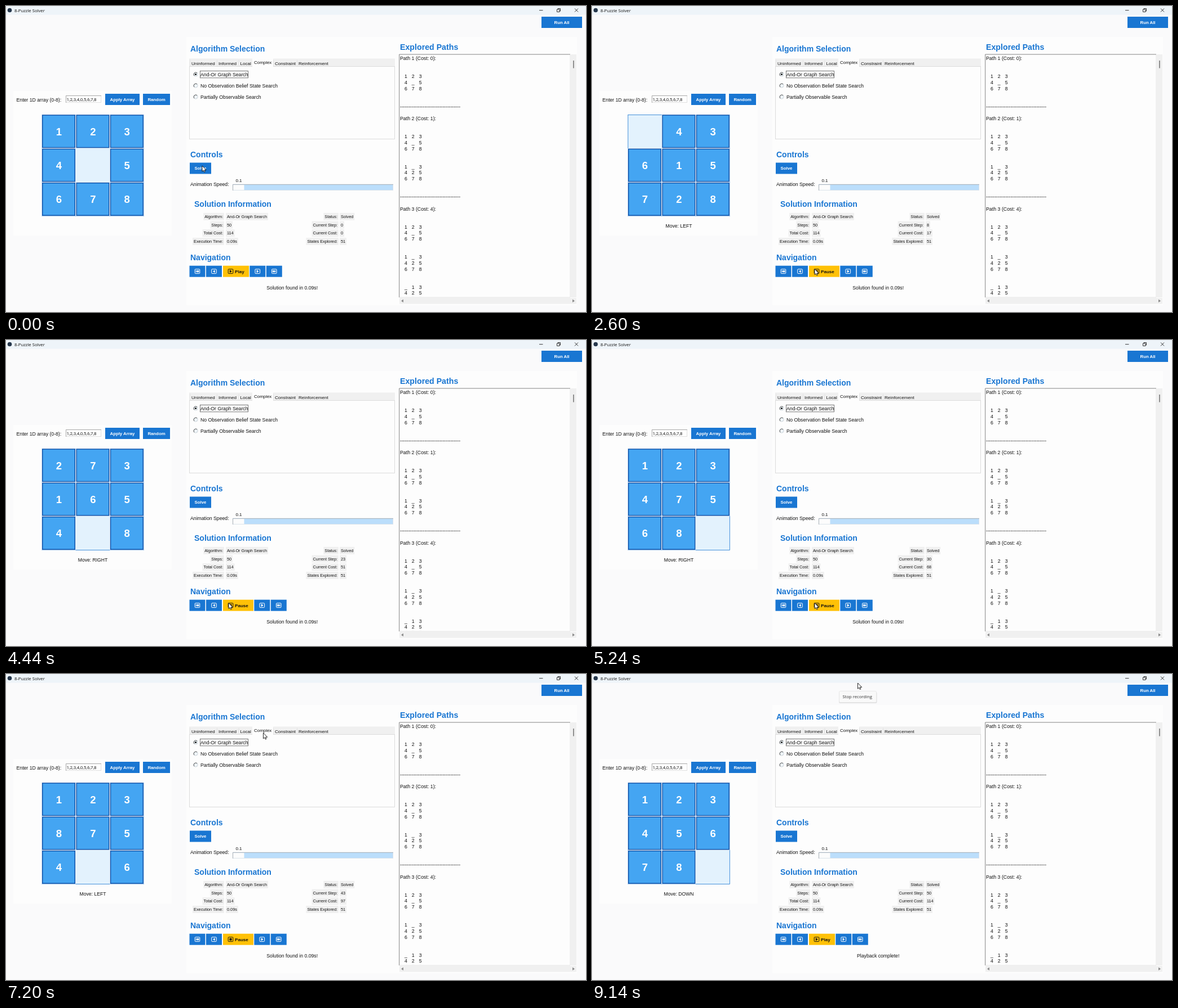
Animation, 1029 px wide and 544 px high, one loop 9.17 s. Source, as an HTML page:

```html
<!DOCTYPE html>
<html lang="en">
<head>
<meta charset="utf-8">
<title>8-Puzzle Solver</title>
<style>
html, body { margin: 0; width: 100%; height: 100%; overflow: hidden; background: #fafafb; }
svg { display: block; width: 100vw; height: 100vh; font-family: "Liberation Sans", Arial, sans-serif; }
text { white-space: pre; }
.b { font-weight: bold; }
.ui { font-family: "Open Sans", "Noto Sans", sans-serif; }
.num { font-family: Roboto, sans-serif; }
</style>
</head>
<body>
<svg viewBox="0 0 1029 544">
  <g id="base"></g>
  <g id="live"></g>
  <path id="cursor" d="M0 0V10.2L2.3 8.1L3.8 11.4L5.4 10.7L4 7.5H7.2Z" fill="#fff" stroke="#111" stroke-width=".9"/>
</svg>
<script>
const BLUE = '#1976d2', GREY = '#f0f0f0';
const pen = document.createElement('canvas').getContext('2d');

const rect = (x, y, w, h, fill, more = '') =>
  `<rect x="${x}" y="${y}" width="${w}" height="${h}" fill="${fill}" ${more}/>`;
const path = (d, stroke, width = 1, fill = 'none') =>
  `<path d="${d}" stroke="${stroke}" stroke-width="${width}" fill="${fill}"/>`;
// y is the middle of the capitals
const text = (x, y, str, size = 8.7, fill = '#111', cls = '', anchor = 'start') =>
  `<text x="${x}" y="${y + size * .36}" font-size="${size}" fill="${fill}" class="${cls}" text-anchor="${anchor}">${str}</text>`;
const heading = (x, y, str, size = 14) => text(x, y, str, size, BLUE, 'b');
const button = (x, y, w, str) =>
  rect(x, y, w, 20, BLUE) + text(x + w / 2, y + 10, str, 7.8, '#fff', 'b', 'middle');

function cell(x, y, str, right) {
  pen.font = '7.3px "Liberation Sans", Arial, sans-serif';
  const w = pen.measureText(str).width;
  return rect(right ? x - w - 2 : x - 2, y - 6.5, w + 4, 13, GREY) +
    text(x, y, str, 7.3, '#111', '', right ? 'end' : 'start');
}

function radio(y, str, on) {
  return `<circle cx="336.5" cy="${y}" r="3.6" fill="#eef5fa" stroke="#ccd3d8"/>` +
    path(`M333.9 ${y + 2.6}A3.7 3.7 0 0 1 339.1 ${y - 2.6}`, '#555') +
    (on ? `<circle cx="336.5" cy="${y}" r="1.6" fill="#111"/>` : '') + text(345, y, str);
}

const glyphs = {
  first: 'M-2.5 -2V2M2.5 -2L0 0L2.5 2ZM0 -2L-2 0L0 2Z',
  prev: 'M1.3 -2L-1.5 0L1.3 2Z',
  play: 'M-1.3 -2.2L1.8 0L-1.3 2.2Z',
  stop: 'M-1.7 -1.7H1.7V1.7H-1.7Z',
  last: 'M2.5 -2V2M-2.5 -2L0 0L-2.5 2ZM0 -2L2 0L0 2Z'
};
const icon = (x, name, color) => `<g transform="translate(${x} 471.7)">` +
  rect(-4.3, -3.9, 8.6, 7.8, 'none', `rx="1" stroke="${color}"`) +
  path(glyphs[name], color, .6, color) + '</g>';
const navButton = (x, name) => rect(x, 461.7, 28, 20, BLUE) + icon(x + 14, name, '#fff');

function explored() {
  const row = k => 93 + 10.7 * k;
  const grid = (k, rows) => rows.map((r, i) => [...r].map((c, j) =>
    text(709.5 + 12.8 * j, row(k + i), c, 8.8, '#111', '', 'middle')).join('')).join('');
  const title = (k, n, cost) => text(699, row(k), `Path ${n} (Cost: ${cost}):`, 8.8);
  const rule = k => text(699, row(k), '-'.repeat(37), 8.7, '#000');
  const a = ['123', '4_5', '678'], b = ['1_3', '425', '678'];
  return title(0, 1, 0) + grid(3, a) + rule(8) +
    title(10, 2, 1) + grid(13, a) + grid(18, b) + rule(23) +
    title(25, 3, 4) + grid(28, a) + grid(33, b) + grid(38, ['_13', '425']);
}

const tabs = [[329, 'Uninformed'], [377, 'Informed'], [415.5, 'Local'], [477, 'Constraint'], [519, 'Reinforcement']];
const info = [['Algorithm:', 'And-Or Graph Search', 'Status:', 'Solved'], ['Steps:', '50', 'Current Step:'],
  ['Total Cost:', '114', 'Current Cost:'], ['Execution Time:', '0.09s', 'States Explored:', '51']];
const infoY = i => 374.3 + 14.75 * i;

document.getElementById('base').innerHTML = [
  rect(0, 0, 1029, 544, '#fafafb'),
  rect(13, 151, 281, 257, '#fdfdfd'), rect(320, 55, 693, 477, '#fdfdfd'),
  // title bar
  rect(0, 0, 1029, 15.5, '#eef4f9'),
  '<circle cx="6.5" cy="7.5" r="3.8" fill="#26384d"/>',
  text(15, 7.8, '8-Puzzle Solver', 7.7, '#111', 'ui'),
  path('M946 7.7H952.5M1009 4.5L1015 10.5M1015 4.5L1009 10.5', '#222', .9),
  path('M977.5 6H982V10.5H977.5ZM979 6V4.5H983.5V9H982', '#222', .9),
  button(950, 19, 72, 'Run All'),
  // input row
  text(18.5, 166.5, 'Enter 1D array (0-8):'),
  rect(106.5, 159.5, 62, 12, '#fff', 'stroke="#e0e0e0"'), path('M106.5 172V159.5H169', '#999', .8),
  text(107.5, 166, '1,2,3,4,0,5,6,7,8', 8, '#222', 'num'),
  button(176, 156, 61, 'Apply Array'), button(243, 156, 48, 'Random'),
  // algorithm tabs
  heading(327, 75.5, 'Algorithm Selection'),
  rect(325, 93.5, 365, 14, GREY), rect(325.5, 107.5, 364, 129, '#fdfdfd', 'stroke="#dcdcdc"'),
  tabs.map(([x, s]) => path(`M${x - 2.5} 95.5V107`, '#ddd', .7) + text(x, 101.8, s, 8.1)).join(''),
  rect(437, 93, 37, 15, '#fdfdfd'), text(440, 100.5, 'Complex', 7.95),
  radio(121.5, 'And-Or Graph Search', true), rect(344.5, 115.5, 85, 12.3, 'none', 'stroke="#555" stroke-width=".8"'),
  radio(141.5, 'No Observation Belief State Search'), radio(161.5, 'Partially Observable Search'),
  // controls
  heading(327, 264, 'Controls'), button(326, 278.5, 38, 'Solve'),
  text(327, 316.5, 'Animation Speed:'), text(413, 310.5, '0.1', 8, '#111', '', 'middle'),
  rect(402, 317, 285, 10.7, '#bbdefb'), rect(403, 318, 19.5, 9.2, '#fcfcfc'),
  path('M402.5 328V317.3H687', '#a3a9ad', .9), path('M403 327.5H686.5V318', '#dde3e8', .8),
  // information
  heading(334, 352, 'Solution Information'),
  info.map((r, i) => cell(385, infoY(i), r[0], true) + cell(392, infoY(i), r[1]) +
    cell(588, infoY(i), r[2], true) + (r[3] ? cell(594, infoY(i), r[3]) : '')).join(''),
  heading(327, 447, 'Navigation'), navButton(325.5, 'first'), navButton(355, 'prev'),
  // explored paths
  heading(699, 72.5, 'Explored Paths', 14.2),
  rect(698, 86, 303, 432, '#fdfdfd'), path('M697.7 518V86H1001', '#777', .9),
  path('M698 518H1001V87', '#e3e3e3'),
  rect(1002, 86, 10, 432, GREY), rect(1006, 97, 1.8, 13.5, '#868686'),
  rect(698, 519, 314, 10.5, GREY),
  path('M705 521.5L701 524.2L705 527Z', 'none', 0, '#8a8a8a'),
  path('M1005 521.5L1009 524.2L1005 527Z', 'none', 0, '#8a8a8a'),
  explored()
].join('');

// moves of the blank, and the price of each direction
const moves = 'ULDDRUULDDRUULDDRUULDDRUULDDRRUULDDLURURDDLULDRURD';
const dirs = { U: [-3, 1, 'UP'], D: [3, 2, 'DOWN'], L: [-1, 3, 'LEFT'], R: [1, 4, 'RIGHT'] };
const states = [{ tiles: [1, 2, 3, 4, 0, 5, 6, 7, 8], cost: 0, move: '' }];
for (const m of moves) {
  const { tiles, cost } = states.at(-1), [shift, price, name] = dirs[m];
  const next = [...tiles], hole = next.indexOf(0);
  next[hole] = next[hole + shift];
  next[hole + shift] = 0;
  states.push({ tiles: next, cost: cost + price, move: 'Move: ' + name });
}

function board(tiles) {
  return rect(63.9, 193.4, 180.4, 180, '#e3f2fd', `stroke="${BLUE}" stroke-width=".8"`) +
    tiles.map((n, i) => {
      const x = 64 + 60.4 * (i % 3), y = 193.3 + 60.3 * Math.floor(i / 3);
      return n ? rect(x - .7, y - .7, 60.4, 60.4, '#f1f7fc') +
        rect(x + .7, y + .7, 57.6, 57.6, '#44a5f2', 'stroke="#0d4ea6" stroke-width="1.4"') +
        text(x + 29.9, y + 29.7, n, 18.5, '#fff', 'b', 'middle') : '';
    }).join('');
}

function scene(step, playing, done, tip) {
  const s = states[step], w = playing ? 54 : 46;
  return board(s.tiles) + text(154, 391, s.move, 8.6, '#111', '', 'middle') +
    cell(594, infoY(1), String(step)) + cell(594, infoY(2), String(s.cost)) +
    rect(385, 461.7, w, 20, '#ffc107') + icon(398.5, playing ? 'stop' : 'play', '#111') +
    text(406, 471.8, playing ? 'Pause' : 'Play', 8.1, '#111', 'b') +
    navButton(386.3 + w, 'play') + navButton(415.8 + w, 'last') +
    text(507.7, 501, done ? 'Playback complete!' : 'Solution found in 0.09s!', 8.7, '#111', '', 'middle') +
    (tip ? rect(438, 32, 67.5, 20, '#000', 'rx="2" opacity=".1"') +
      rect(438.5, 30.5, 66, 20, '#f9f9f9', 'rx="2" stroke="#e2e2e2" stroke-width=".7"') +
      text(470.7, 40.5, 'Stop recording', 7.7, '#333', 'ui', 'middle') : '');
}

// piecewise interpolation through [time, ...values]
function track(keys, t, ease = k => k) {
  if (t <= keys[0][0]) return keys[0].slice(1);
  const i = keys.findIndex(k => k[0] > t);
  if (i < 0) return keys.at(-1).slice(1);
  const [t0, ...a] = keys[i - 1], [t1, ...b] = keys[i], k = ease((t - t0) / (t1 - t0));
  return a.map((v, j) => v + (b[j] - v) * k);
}
const pace = [[1580, 0], [2540, 8], [3520, 16], [5200, 30], [6420, 38], [7890, 48], [8190, 50]];
const pointer = [[0, 348, 284], [450, 348, 284], [1250, 395, 467.5], [6700, 395, 467.5], [7400, 471.5, 16]];
const smooth = k => k * k * (3 - 2 * k);

const live = document.getElementById('live'), cursor = document.getElementById('cursor');
let shown = '';
function frame(now) {
  const t = now % 9170;
  const state = [Math.floor(track(pace, t)[0]), t >= 1600 && t < 8335, t >= 8335, t >= 8650];
  if (state.join() !== shown) {
    shown = state.join();
    live.innerHTML = scene(...state);
  }
  cursor.setAttribute('transform', `translate(${track(pointer, t, smooth).join(' ')})`);
  requestAnimationFrame(frame);
}
frame(0);
</script>
</body>
</html>
```
